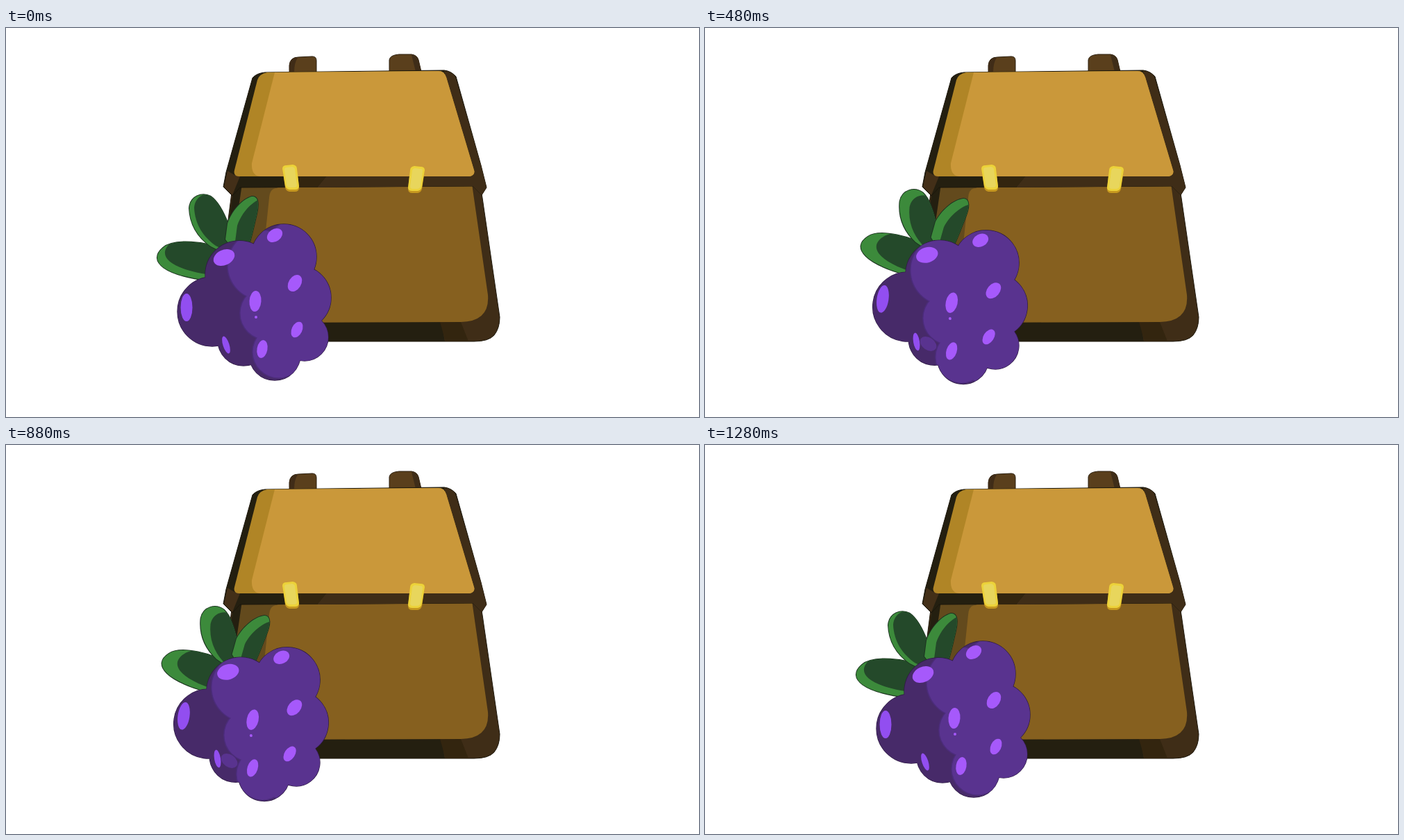
Write an HTML page that moves like this. It is 998 by 561 pixels and loops after 1440 ms.

```html
<!DOCTYPE html>
<html lang="en">
<meta charset="utf-8">
<title>Bag and berry</title>
<style>
  html, body { margin: 0; width: 100%; height: 100%; overflow: hidden; background: #fff }
  svg { display: block; width: 100%; height: 100% }
</style>
<svg viewBox="0 0 998 561">
  <defs>
    <clipPath id="bodyClip"><path id="clipShape"/></clipPath>
  </defs>

  <!-- handles -->
  <path fill="#5a3f1c" stroke="#2c2010" d="M408 64V54Q409 42 421 42L441 41Q447 41 447 47V64Z"/>
  <path fill="#402c17" d="M408 64V54Q409 43 420 43Q415 50 415 64Z"/>
  <path fill="#5a3f1c" stroke="#2c2010" d="M552 63V46Q553 39 566 38H584Q592 39 594 46L598 63Z"/>
  <path fill="#3f2d18" d="M584 39Q592 39 594 46L598 63H590Z"/>

  <!-- lower bag -->
  <path fill="#3f2d17" stroke="#1e180c" d="M327 222H682L686 245L711 417Q711 433 703 443Q695 452 674 452H320L317 300Z"/>
  <path fill="#241f10" d="M328 228H345V420H626L632 452H320L318 300Z"/>
  <path fill="#33250f" d="M625 424H655L666 452H633Z"/>
  <path fill="#634a1d" d="M340 225H400V425H325L329 300Z"/>
  <path fill="#86601f" d="M390 231L400 225H671L694 385Q697 423 655 424L360 425L379 245Q380 231 390 231Z"/>

  <!-- flap -->
  <path fill="#241f10" stroke="#1b160b" d="M355 72Q361 65 373 64L631 61Q641 62 648 70L684 198L692 230L685 241L672 228L337 230L326 242L313 229L317 208Z"/>
  <path fill="#3f2d17" d="M631 62Q641 62 647 70L684 198L692 230L685 241L672 228L448 230L462 213H672Z"/>
  <path fill="#432f18" d="M319 206L329 212L337 214L326 241L314 229Z"/>
  <path fill="#33250f" d="M422 213H462L448 230H420Z"/>
  <path fill="#b08526" d="M376 64Q365 66 362 75L329 205Q327 213 335 214H668Q676 212 674 205L634 71Q631 62 623 62Z"/>
  <path fill="#ca983a" d="M387 64L354 195Q353 213 366 214H668Q676 212 674 205L634 71Q631 62 623 62Z"/>

  <!-- clasps -->
  <g id="clasp">
    <path fill="#c6981f" d="M398 203Q398 198 404 198L413 197Q419 198 419 203L422 230Q422 236 416 236H408Q403 235 402 230Z"/>
    <path fill="#ecd23a" d="M398 203Q398 198 404 198L413 197Q419 198 419 203L422 228Q422 233 416 233H408Q403 232 402 227Z"/>
    <path fill="#e8d65c" d="M401 204Q401 201 405 201L412 200Q416 201 416 204L419 226Q419 230 415 230H409Q405 230 404 226Z"/>
  </g>
  <use href="#clasp" transform="matrix(-1 0 0 1 1001 2)"/>

  <!-- berry -->
  <g id="berry">
    <g id="leaves"></g>
    <path id="body" fill="#472a69" stroke="#2f1b45" stroke-width="1.4" paint-order="stroke"/>
    <g clip-path="url(#bodyClip)">
      <g id="lit" fill="#59338f">
        <circle id="sideSpot" cx="293" cy="404" r="8.5"/>
        <ellipse id="lowSpot" cx="316" cy="459" rx="13" ry="9" transform="rotate(35 316 459)"/>
        <path id="litShape" stroke="#4b2c7a" stroke-width="3" paint-order="stroke"/>
      </g>
    </g>
    <g id="shine"></g>
  </g>
</svg>
<script>
const $ = id => document.getElementById(id);
const PIVOT = '342 369', TURN = 12.5 / 3;

const circlePath = ([x, y, r]) =>
  `M${x - r} ${y}a${r} ${r} 0 1 1 ${2 * r} 0a${r} ${r} 0 1 1 ${-2 * r} 0Z`;

// lobes as [x, y, radius]
const bodyPath = [
  [400, 330, 47], [422, 389, 46], [430, 446, 34], [387, 471, 37],
  [342, 450, 37], [297, 409, 50], [336, 356, 49], [375, 390, 70]
].map(circlePath).join('');
$('body').setAttribute('d', bodyPath);
$('clipShape').setAttribute('d', bodyPath);
$('litShape').setAttribute('d',
  [[341, 353, 50], [347, 422, 38], [364, 478, 37]].map(circlePath).join('') +
  'M345 310L400 270H540V520H400L368 505L347 420Z');

// highlights as [x, y, rx, ry, tilt]
const bright = '#a659fb', dim = '#924ef0';
$('shine').innerHTML = [
  [314, 331, 16, 11, -25, bright], [387, 299, 12, 9, -35, bright],
  [260, 403, 8.5, 20, 0, dim], [359, 394, 8.5, 15, 4, bright],
  [360, 417, 2, 2, 0, bright], [416, 368, 9, 13, 32, bright],
  [419, 435, 7.5, 12, 25, bright], [369, 463, 7.5, 13, 10, bright],
  [317, 457, 4.5, 13, -18, dim]
].map(([x, y, rx, ry, tilt, fill]) =>
  `<ellipse cx="${x}" cy="${y}" rx="${rx}" ry="${ry}" fill="${fill}" transform="rotate(${tilt} ${x} ${y})"/>`
).join('');

// each leaf has an inner shade that slides at every step
const leaves = [
  { d: 'M314 320C290 308 242 303 226 317C203 337 230 357 292 364Z',
    slide: [[11, -7], [15, -6], [22, -3], [27, -3]] },
  { d: 'M328 306C320 280 308 252 295 243C282 236 265 243 264 260C265 285 278 303 295 315L315 325Z',
    slide: [[7, -1], [11, 2], [15, 6], [22, 18]] },
  { d: 'M316 305L319 282C325 264 340 247 354 243C364 242 364 255 361 268C357 285 354 300 350 312L325 316Z',
    slide: [[14, 3], [15, 3], [13, 6], [11, 20]] }
];
$('leaves').innerHTML = leaves.map(({ d }, i) => `
  <clipPath id="leafClip${i}"><path d="${d}"/></clipPath>
  <path d="${d}" fill="#3c8a3b" stroke="#1c3320" stroke-width="2" paint-order="stroke"/>
  <g clip-path="url(#leafClip${i})"><path id="shade${i}" d="${d}" fill="#24492a"/></g>`).join('');

const place = (id, transform) => $(id).setAttribute('transform', transform);
const stepFrom = (t, start) => Math.max(0, Math.min(3, Math.floor((t - start) / 80) + 1));

function draw(now) {
  const t = now % 1440;
  const step = stepFrom(t, 400) - stepFrom(t, 880);
  const angle = step * TURN, rest = 3 - step;
  place('berry', `rotate(${angle} ${PIVOT})`);
  // the lit side keeps its upright pose and only slides
  place('lit', `rotate(${-angle} ${PIVOT}) translate(${5.5 * rest ** 1.5} ${rest * -3.6})`);
  leaves.forEach(({ slide }, i) => place('shade' + i, `translate(${slide[step]})`));
  $('sideSpot').style.opacity = +(step === 3);
  $('lowSpot').style.opacity = +(step >= 2);
  requestAnimationFrame(draw);
}
draw(performance.now());
</script>
</html>
```
